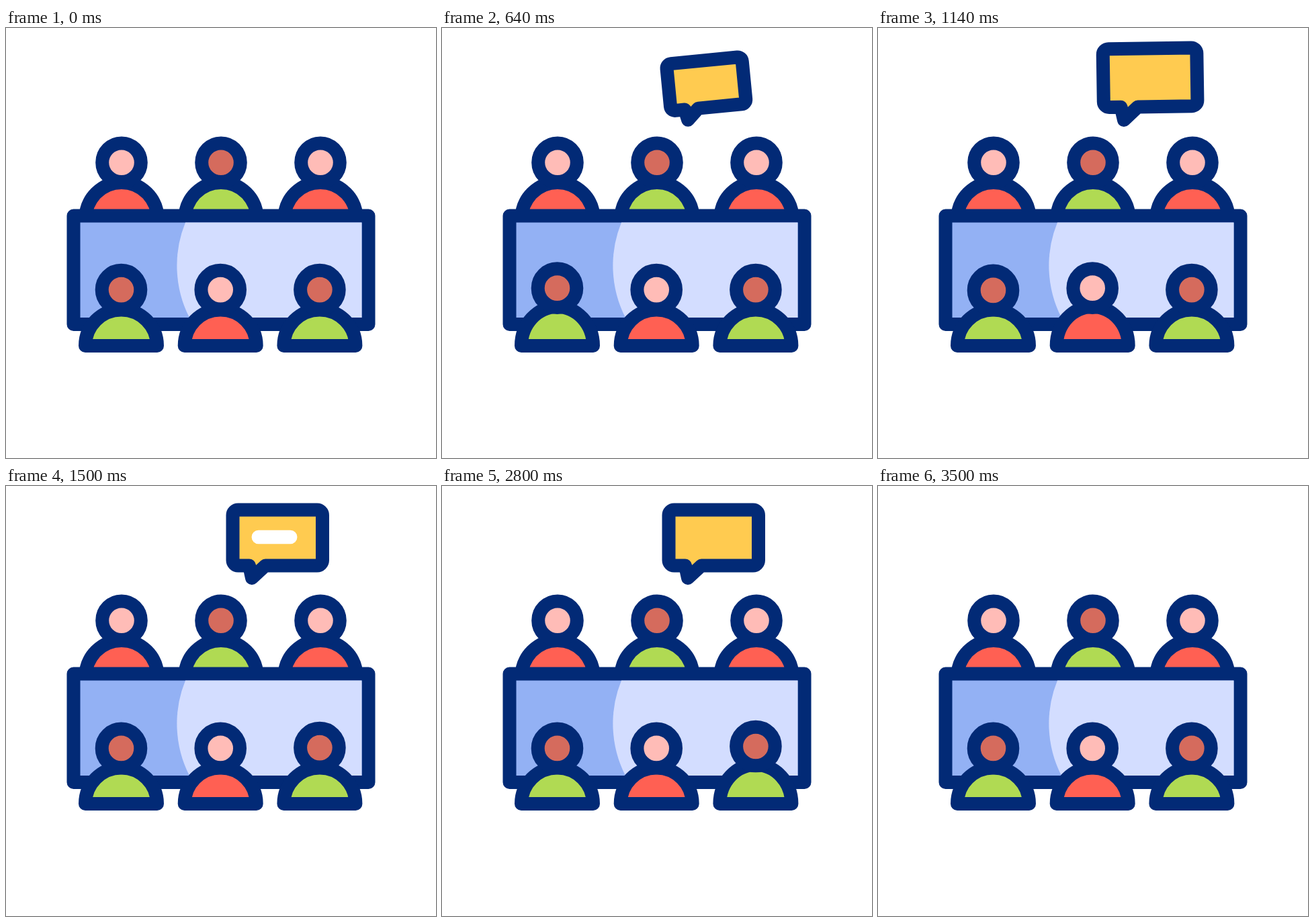
Recreate the animation shown at these times as an HTML page. Size 640 by 640 pixels, loop 3.6 s.

```html
<!DOCTYPE html>
<html lang="en">
<head>
<meta charset="utf-8">
<title>Meeting</title>
<style>
  html, body { margin: 0; width: 100%; height: 100%; overflow: hidden; background: #fff; }
  svg { display: block; width: 100%; height: 100%; }
  .ink { stroke: #022a76; stroke-width: 20; stroke-linejoin: round; }
  .bubble { fill: #ffcb50; vector-effect: non-scaling-stroke; }
</style>
</head>
<body>
<svg viewBox="0 0 640 640">
  <g id="back"></g>
  <rect class="ink" x="100.5" y="279.5" width="439" height="161.5" fill="#93b1f4"/>
  <path d="M267 289.5A170 170 0 0 0 273 431H529.5V289.5Z" fill="#d3ddff"/>
  <g id="front"></g>
  <g id="bubble">
    <path class="ink bubble" d="M345.5 35.5H463a8 8 0 0 1 8 8V110.5a8 8 0 0 1-8 8H386L366 137 362 118.5H345.5a8 8 0 0 1-8-8V43.5a8 8 0 0 1 8-8Z"/>
    <path id="line" stroke="#fff" stroke-width="20.5" stroke-linecap="round"/>
  </g>
</svg>
<script>
const LOOP = 3600;
const PINK = '#ffbcb7', BROWN = '#d56b5d', RED = '#ff6053', GREEN = '#b0da53';
const $ = id => document.getElementById(id);
const progress = (t, from, to) => Math.max(0, Math.min(1, (t - from) / (to - from)));
const smooth = p => p * p * (3 - 2 * p);

// Adds a person and returns a function that raises the head and shoulders.
function person(parent, x, headY, skin, shirt) {
  $(parent).insertAdjacentHTML('beforeend',
    `<path class="ink" fill="${shirt}"/><circle class="ink" cx="${x}" cy="${headY}" r="28.8" fill="${skin}"/>`);
  const head = $(parent).lastChild, body = head.previousSibling;
  const base = headY + 83.3;
  const pose = (headLift, bodyLift) => {
    head.setAttribute('cy', headY - headLift);
    body.setAttribute('d', `M${x - 53.5} ${base}a53.5 ${53.5 + bodyLift} 0 0 1 107 0Z`);
  };
  pose(0, 0);
  return pose;
}

const sitters = [];
for (let i = 0; i < 3; i++) {
  const [shirt, otherShirt] = i % 2 ? [GREEN, RED] : [RED, GREEN];
  const [skin, otherSkin] = i % 2 ? [BROWN, PINK] : [PINK, BROWN];
  person('back', 172 + 148 * i, 200.2, skin, shirt);
  sitters.push(person('front', 171.5 + 147.7 * i, 389.6, otherSkin, otherShirt));
}
const bobStarts = [240, 740, 2385];

// Quick rise, slower fall.
const bob = age => 5.6 * Math.sin(Math.PI * progress(age, 0, 560) ** .6);

function drawBubble(t) {
  const grow = Math.sin(Math.PI / 2 * progress(t, 240, 960)) ** 1.2;
  const turn = smooth(progress(t, 240, 760));
  const settle = smooth(progress(t, 960, 1240));
  const leave = progress(t, 3000, 3500) ** 3;
  const scale = 1.16 * grow - .16 * settle - .73 * leave;
  const angle = -22 + 19 * turn + 3 * settle - 22 * leave;
  $('bubble').setAttribute('opacity', progress(t, 240, 510) * progress(t, 3500, 3380));
  $('bubble').setAttribute('transform',
    `translate(366 135.5) rotate(${angle}) scale(${scale}) translate(-366 -135.5)`);

  const length = 56 * (smooth(progress(t, 1200, 1600)) - smooth(progress(t, 2320, 2720)));
  $('line').setAttribute('d', length > .1 ? `M375.8 76h${length}` : '');
}

function draw(t) {
  sitters.forEach((pose, i) => {
    const age = t - bobStarts[i];
    pose(bob(age) - .8 * progress(age, 0, 560), bob(age - 90));
  });
  drawBubble(t);
}

const begin = performance.now();
function frame() {
  draw((performance.now() - begin) % LOOP);
  requestAnimationFrame(frame);
}
frame();
</script>
</body>
</html>
```
